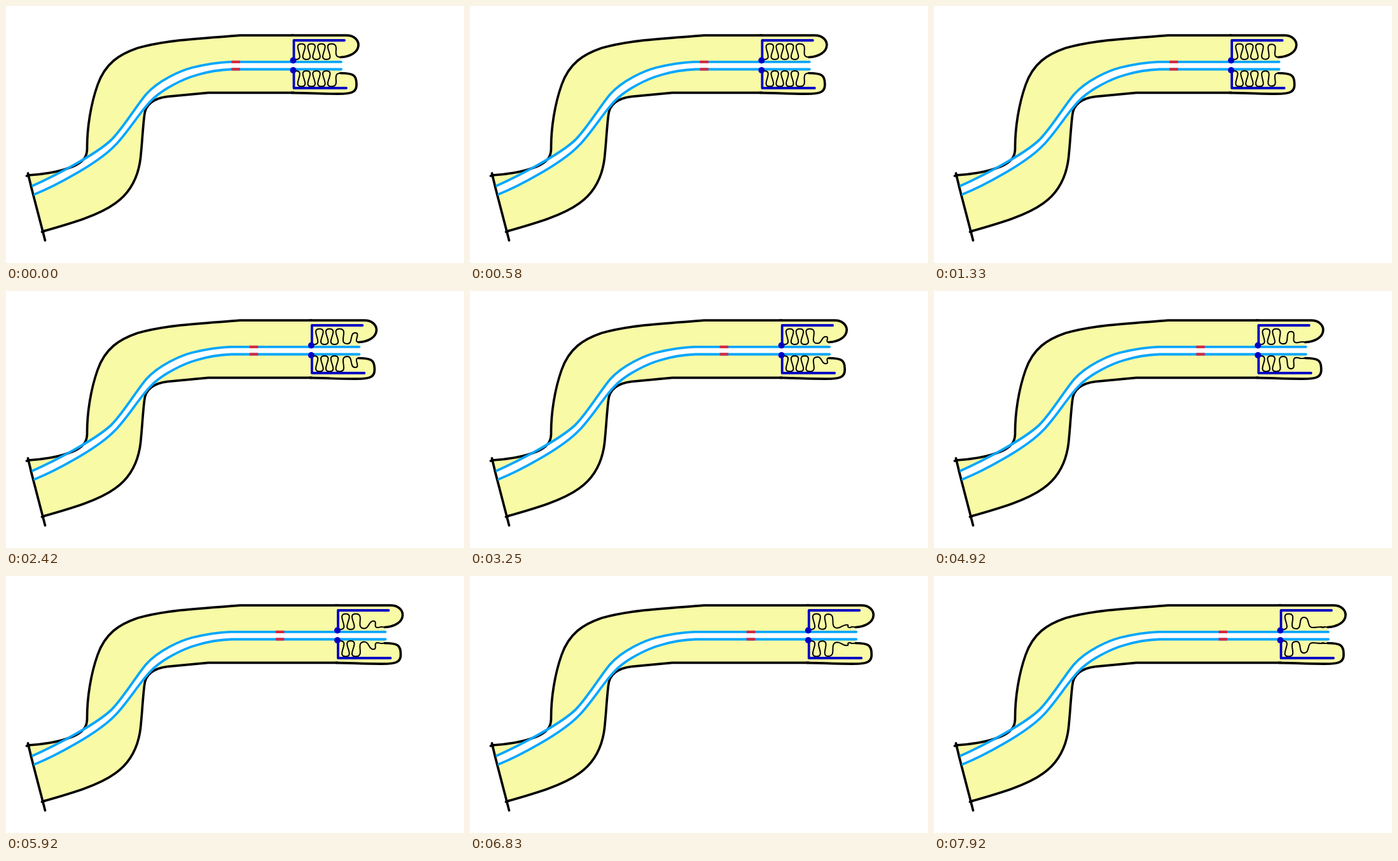
Write an HTML page that moves like this. It is 720 px wide and 404 px high and loops after 8000 ms.

```html
<!DOCTYPE html>
<html lang="en">
<head>
<meta charset="utf-8">
<style>
  html, body { margin: 0; width: 100%; height: 100%; overflow: hidden; background: #fff; }
  svg { display: block; width: 100%; height: 100%; fill: none; stroke-linecap: round; stroke-linejoin: round; }
  .skin { fill: #f8faa6; }
  .channel { fill: #fff; }
  .wall { stroke: #000; stroke-width: 3.7; }
  .tube { stroke: #04a6ff; stroke-width: 3.8; }
  .coil { stroke: #000; stroke-width: 2; }
  .frame { stroke: #0000c4; stroke-width: 3.8; }
  .node { fill: #0000c4; }
  .mark { fill: #d42a42; }
</style>
</head>
<body>
<svg viewBox="0 0 720 404">
  <defs>
    <path id="lipTop" d="M449 46.2H534C548 46 554.5 54 554 62C553.5 72 542 80 526 80.5"/>
    <path id="lipLow" d="M449 136.3C480 137 505 138.6 530 138C545 137.5 551 134 551 124C551.5 108 545 105.5 526 105.5"/>
    <path id="coil"/>
  </defs>
  <path class="skin" id="skin"/>
  <g class="tip skin">
    <use href="#lipTop"/>
    <use href="#lipLow"/>
    <path d="M449 46V88H526V80zM449 136.5V99.5H526V105z"/>
  </g>
  <path class="channel" id="channel"/>
  <path class="wall" id="walls"/>
  <path class="wall" d="M34.5 263L40 286L61.5 368.5M32.5 267L37 266M56.5 355L61 353.5"/>
  <path class="tube" id="tubes"/>
  <g class="tip">
    <g class="wall">
      <use href="#lipTop"/>
      <use href="#lipLow"/>
    </g>
    <g class="coil">
      <use href="#coil"/>
      <use href="#coil" transform="matrix(1 0 0 -1 0 186)"/>
    </g>
    <path class="mark" d="M354.5 85.7h13.5v4.2h-13.5zM354.5 97.2h13.5v4.2h-13.5z"/>
    <path class="frame" d="M452.5 85V54H532M452.5 101V129H535"/>
    <circle class="node" cx="451.5" cy="85.5" r="5"/>
    <circle class="node" cx="451.5" cy="101" r="5"/>
  </g>
</svg>
<script>
const LOOP = 8000, STEPS = 96, TRAVEL = 93 / 95;
const FOLDS = 4, PITCH = 15.7;
const set = (id, d) => document.getElementById(id).setAttribute('d', d);
const tips = document.querySelectorAll('.tip');

// Upper edges run from base to tip, lower edges run back
const wallTop = 'M34.5 266C66 264 94 258 110 250C124 243 128 234 127.5 222C127.5 192 133 155 144 124' +
  'C156 90 178 76 207 66C252 53 308 51 368 46.2';
const wallLow = 'H318L254 142.3C232 145 219 154 217.5 172C215 192 214 216 211.5 239' +
  'C208 268 196 293 172 310C146 329 105 341 59 354';
const tubeTop = 'M42 282.5C70 270 138 236 165 211C183 194 206 155 221 138C242 115 277 101 292 97' +
  'C312 92 330 88.5 352 87.8';
const tubeLow = 'H355C335 100.3 318 103 300 108.5C280 114 246 130 227 150C211 166 189 202 171 219.5' +
  'C144 248 75 284 45 296';

// Crest i of the folded lining; the one nearest the lip flattens first
function crest(i, d) {
  const t = Math.max(0, Math.min(1, (d - 10 - 33 * (FOLDS - 1 - i)) / 50));
  return {
    t,
    x: Math.min(464.5 + PITCH * i + 20 * t ** 0.8, 521),
    y: 59.5 + 20.5 * t * t * (3 - 2 * t)
  };
}

function coil(d) {
  let x = 456, y = 84, path = `M${x} ${y}`;
  const bend = (nx, ny, k) => {
    path += `C${x + k} ${y} ${nx - k} ${ny} ${nx} ${ny}`;
    x = nx;
    y = ny;
  };
  for (let i = 0; i < FOLDS; i++) {
    const c = crest(i, d), next = crest(i + 1, d);
    const k = 5 + 11 * (1 - c.t) ** 2;
    bend(c.x, c.y, k);
    if (i < FOLDS - 1) bend((c.x + next.x) / 2, 84 - 3 * next.t, k);
    else bend(526, 80.5, k);
  }
  return path;
}

function draw(ms) {
  const d = Math.floor((ms % LOOP + 3.4) * STEPS / LOOP) % STEPS * TRAVEL;
  const neck = 452 + d, end = 527 + d;
  set('skin', `${wallTop}H${neck}V136.3${wallLow}Z`);
  set('walls', `${wallTop}H${neck}M${neck} 136.3${wallLow}`);
  set('channel', `${tubeTop}H${end}V99.5${tubeLow}Z`);
  set('tubes', `${tubeTop}H${end}M${end} 99.5${tubeLow}`);
  set('coil', coil(d));
  tips.forEach(g => g.setAttribute('transform', `translate(${d} 0)`));
}

const t0 = performance.now();
function tick() {
  draw(performance.now() - t0);
  requestAnimationFrame(tick);
}
tick();
</script>
</body>
</html>
```
